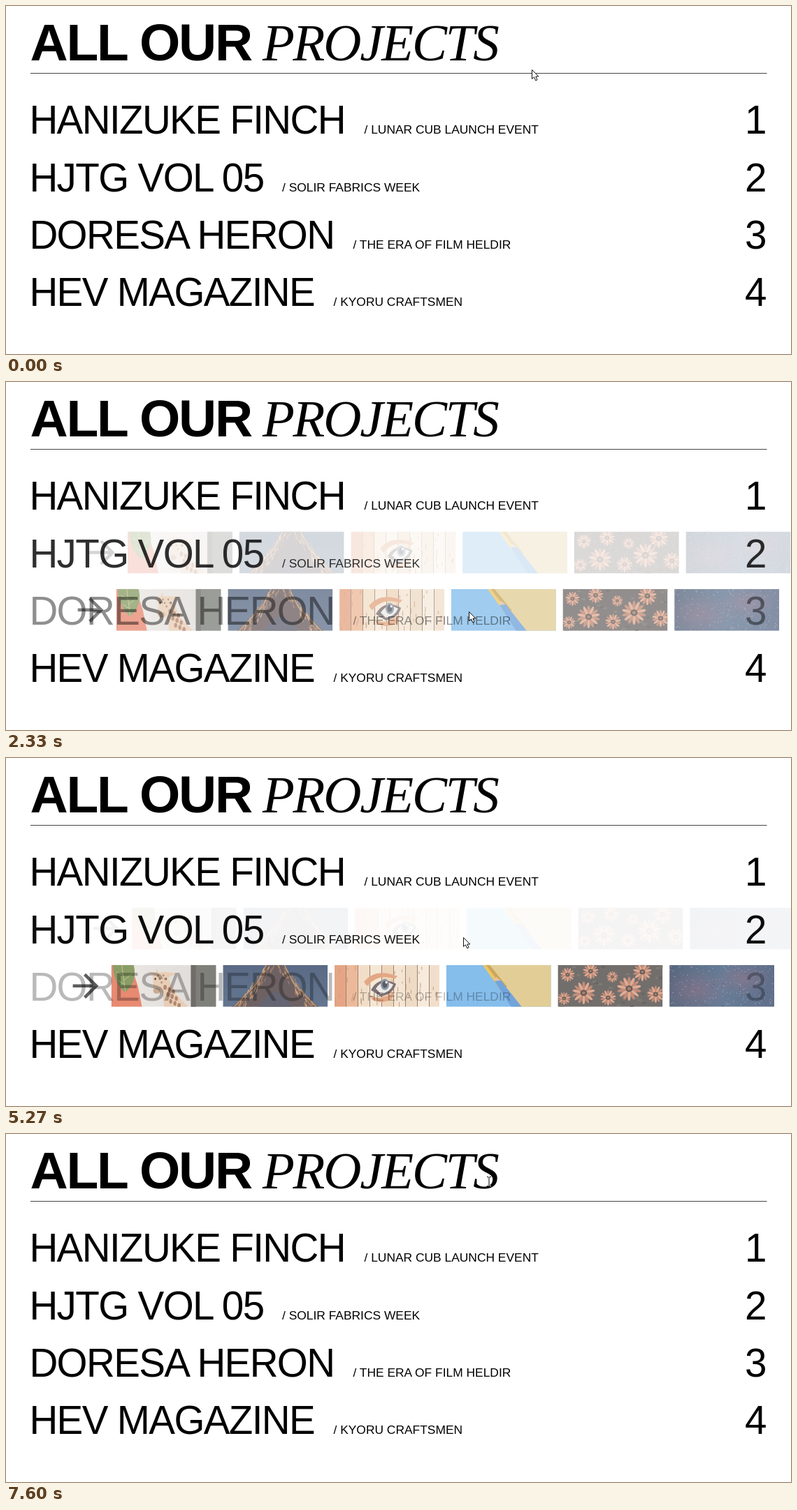
These frames come from a looping animation (1123 px wide and 499 px high, 8540 ms). An HTML page:

```html
<!DOCTYPE html>
<html lang="en">
<head>
<meta charset="utf-8">
<title>All our projects</title>
<style>
  html, body { margin: 0; width: 100%; height: 100%; overflow: hidden; background: #fff; }
  #stage { display: block; width: 1123px; height: 499px; }
  text { font-family: "Liberation Sans", Arial, sans-serif; fill: #000; }
  .bold { font-size: 75px; font-weight: 700; letter-spacing: -2.2px; }
  .italic { font: italic 75px "Liberation Serif", "Times New Roman", serif; letter-spacing: -2.2px; }
  .name { font-size: 56.5px; letter-spacing: -1.6px; }
  .note { font-size: 17.4px; }
  #beam { mix-blend-mode: difference; }
</style>
</head>
<body>
<svg id="stage" viewBox="0 0 1123 499">
  <defs>
    <linearGradient id="wall"><stop offset="0" stop-color="#e6e1dc"/><stop offset="1" stop-color="#d3cdc9"/></linearGradient>
    <linearGradient id="dusk" x2="0" y2="1"><stop offset="0" stop-color="#1f3458"/><stop offset="1" stop-color="#2c4468"/></linearGradient>
    <linearGradient id="sky"><stop offset="0" stop-color="#1d3150"/><stop offset=".5" stop-color="#2f4c70"/><stop offset="1" stop-color="#263a60"/></linearGradient>
    <radialGradient id="glow"><stop offset="0" stop-color="#8a4560" stop-opacity=".4"/><stop offset="1" stop-color="#8a4560" stop-opacity="0"/></radialGradient>
    <g id="strip">
      <path d="M-55 30H-22M-38 13.500L-21.500 30L-38 46.500" fill="none" stroke="#222" stroke-width="4.500"/>
      <g id="photos"></g>
    </g>
  </defs>
  <rect width="1123" height="499" fill="#fff"/>
  <text class="bold" x="34.500" y="78">ALL OUR</text>
  <text class="italic" x="367" y="78">PROJECTS</text>
  <path d="M35 96.500H1088.500" stroke="#444"/>
  <g id="rows"></g>
  <path id="arrow" d="M.5 .5V13.500L3.500 10.800L5.700 15.800L8 14.800L5.900 10H9.800Z" fill="#fff" stroke="#111" stroke-linejoin="round"/>
  <path id="beam" d="M-3 -6.500H-1L0 -5.500L1 -6.500H3M0 -5.500V5.500M-3 6.500H-1L0 5.500L1 6.500H3" fill="none" stroke="#fff"/>
</svg>
<script>
const LOOP = 8540, STEP = 200 / 3, FADE = 300;
const ROW_TOP = 132.2, ROW_STEP = 82.3;
const X_OUT = 182, SLIDE = 43;
const $ = id => document.getElementById(id);

const projects = [
  ['HANIZUKE FINCH', '/ LUNAR CUB LAUNCH EVENT', 512.5],
  ['HJTG VOL 05', '/ SOLIR FABRICS WEEK', 395],
  ['DORESA HERON', '/ THE ERA OF FILM HELDIR', 496.5],
  ['HEV MAGAZINE', '/ KYORU CRAFTSMEN', 468.5],
];

// row, pointer enters, pointer leaves
const hovers = [
  [0, 235, 1120], [1, 1235, 2180], [2, 2235, 3183], [3, 3246, 4280],
  [2, 4322, 5210], [1, 5246, 6210], [0, 6295, 7300],
];

// start, end, x, y reached at the end
const moves = [
  [0, 0, 752, 91], [20, 400, 716, 160], [900, 1400, 676, 255],
  [1960, 2360, 662, 330], [2960, 3330, 646, 397], [4130, 4470, 647, 326],
  [5050, 5310, 655, 252], [6080, 6400, 661, 156], [7150, 7530, 691, 68],
];

let seed = 7;
const random = () => (seed = seed * 16807 % 2147483647) / 2147483647;
const times = (n, make) => Array.from({ length: n }, (_, i) => make(i)).join('');
const box = (x, y, w, h, fill) => `<rect x="${x}" y="${y}" width="${w}" height="${h}" fill="${fill}"/>`;
const oval = (x, y, rx, ry, fill, extra = '') =>
  `<ellipse cx="${x}" cy="${y}" rx="${rx}" ry="${ry}" fill="${fill}" ${extra}/>`;
const path = (d, fill) => `<path d="${d}" fill="${fill}"/>`;
const line = (d, color, width = 1) => `<path d="${d}" fill="none" stroke="${color}" stroke-width="${width}"/>`;

function giraffe() {
  const coat = '#e0bd9c', spot = '#9a5c3a';
  return box(0, 0, 150, 60, 'url(#wall)')
    + path('M0 0H28L38 30L44 60H0Z', '#e0603f')
    + path('M2 0H32Q38 24 20 39Q4 28 2 0Z', '#5f7a2f')
    + line('M15 0L20 38M17 14L7 10M18 22L30 12M19 28L9 22', '#a3b364')
    + box(114, 0, 36, 60, '#50524a') + box(114, 0, 7, 60, '#3a3832')
    + path('M70 26L82 20L91 40L110 60H76Z', coat)
    + path('M59 14L53 10L64 11L65 5L68 11L76 10L93 12L82 18L80 29L70 41L60 38L60 26Z', coat)
    + oval(65, 37, 5, 4, '#b48b6d') + oval(63, 20, 1.5, 1.8, '#241a16') + oval(78, 20, 1.5, 1.8, '#241a16')
    + times(12, i => oval(77 + i % 3 * 6 + (i >> 2) * 4, 32 + (i >> 2) * 10 + i % 3 * 3, 2.2, 3.4, spot))
    + times(5, i => oval(67 + i * 2.5, 15 + i % 3 * 5, 1.3, 1.6, spot));
}

function tower() {
  const braces = times(130, i => {
    const y = random() * 60, side = random() < .5 ? -1 : 1;
    const x = 75 + side * (random() * 14 + y * .72);
    return line(`M${x} ${y}l${side * 2} 5`, i % 3 ? '#7d4f32' : '#d09355', 1.2);
  });
  return box(0, 0, 150, 60, 'url(#dusk)')
    + path('M62 0H88L101 26L137 60H13L49 26Z', '#38272a') + braces
    + path('M75 38Q60 45 51 60H99Q90 45 75 38Z', '#2b2c40')
    + line('M62 0L49 26L16 60M88 0L101 26L134 60', '#b97b45', 1.3);
}

function planks() {
  const tones = ['#dc8458', '#e6a175', '#eed3b4', '#f2dfc6', '#e9c7a2', '#f0dcc4', '#e8cfb0', '#f3e4d0', '#ecd4b8'];
  return tones.map((tone, i) => box(i * 17, 0, 17, 60, tone) + box(i * 17 + 16, 0, 1, 60, '#765240')).join('')
    + times(40, () => box(random() * 150, random() * 55, 1, 3 + random() * 6, '#b77b56'))
    + path('M42 24Q58 4 90 16L86 20Q64 11 46 30Z', '#d98757')
    + path('M52 36Q64 14 88 27Q84 42 66 45Z', '#4d3f42')
    + path('M59 34Q68 19 84 28Q79 40 66 41Z', '#e8e4df')
    + oval(72, 28, 6, 8, '#5f7284') + oval(72, 28, 3.5, 5, '#1c2029') + oval(74, 25, 1.5, 1.8, '#fff')
    + path('M50 43Q66 53 86 38L82 49Q66 57 54 50Z', '#d98757');
}

function pencils() {
  return box(0, 0, 150, 60, '#59a5e4') + path('M57 0H150V60H101Z', '#d8bb70')
    + path('M52 0H62L87 31L92 46L79 38Z', '#e3b12f') + path('M57 0H62L87 31L83 35Z', '#b88720')
    + path('M79 38L87 31L92 46Z', '#e6c8a0') + path('M88 42L91 40L92 46Z', '#333')
    + path('M69 23L78 22L108 60H93Z', '#3e83cf') + path('M69 23L71 17L78 22Z', '#d9a88a');
}

function flowers() {
  const bloom = (x, y, r) => times(14, i =>
    oval(x, y - r * .62, r * .13, r * .4, i % 2 ? '#d48d6c' : '#ad6248', `transform="rotate(${i * 360 / 14} ${x} ${y})"`))
    + oval(x, y, r * .3, r * .27, '#30211f') + oval(x, y, r * .15, r * .13, '#8c5635');
  return box(0, 0, 150, 60, '#3f3936')
    + times(45, () => oval(random() * 150, random() * 60, 3, 1.5, random() < .5 ? '#524b42' : '#302c2c'))
    + bloom(14, 14, 10) + bloom(47, 9, 11) + bloom(121, 10, 13) + bloom(78, 17, 8)
    + bloom(37, 40, 16) + bloom(102, 34, 17) + bloom(72, 47, 11) + bloom(140, 42, 12) + bloom(9, 48, 9);
}

function stars() {
  const tints = ['#86a9c4', '#b56f82', '#4f7899', '#16223c'];
  return box(0, 0, 150, 60, 'url(#sky)')
    + oval(38, 36, 50, 30, 'url(#glow)') + oval(105, 20, 42, 24, 'url(#glow)')
    + times(260, i => oval((random() * 150).toFixed(1), (random() * 60).toFixed(1), .6, .6, tints[i % 4]));
}

$('photos').innerHTML = [giraffe, tower, planks, pencils, flowers, stars]
  .map((draw, i) => `<svg x="${i * 159.7}" width="150" height="60">${draw()}</svg>`).join('');

$('rows').innerHTML = projects.map(([name, note, noteX], i) => {
  const y = ROW_TOP + i * ROW_STEP, base = Math.round(y + 51);
  return `<g><use href="#strip" y="${y}"/><g>
    <text class="name" x="33.400" y="${base}">${name}</text>
    <text class="note" x="${noteX}" y="${base}">${note}</text>
    <text class="name" x="1057" y="${base}">${i + 1}</text></g></g>`;
}).join('');
const rows = [...$('rows').children].map(g => ({ strip: g.children[0], label: g.children[1] }));

const clamp = v => Math.min(1, Math.max(0, v));
const smooth = u => u * u * (3 - 2 * u);

// cubic-bezier(.25, .1, .25, 1)
function ease(x) {
  if (x <= 0 || x >= 1) return clamp(x);
  const curve = (a, b, s) => 3 * a * s * (1 - s) ** 2 + 3 * b * s * s * (1 - s) + s ** 3;
  let low = 0, high = 1;
  for (let i = 0; i < 18; i++) {
    const mid = (low + high) / 2;
    if (curve(.25, .25, mid) < x) low = mid; else high = mid;
  }
  return curve(.1, 1, low);
}

function pointerAt(t) {
  let [, , x, y] = moves[0];
  for (const [start, end, toX, toY] of moves.slice(1)) {
    const u = smooth(clamp((t - start) / (end - start)));
    x += (toX - x) * u;
    y += (toY - y) * u;
  }
  return [x, y];
}

function render(t) {
  const shown = [0, 0, 0, 0];
  for (const [row, enter, leave] of hovers)
    shown[row] += ease((t - enter) / FADE) * (1 - ease((t - leave) / FADE));
  rows.forEach(({ strip, label }, i) => {
    strip.setAttribute('x', X_OUT - SLIDE * shown[i]);
    strip.setAttribute('opacity', shown[i]);
    label.setAttribute('opacity', 1 - shown[i]);
  });
  const [x, y] = pointerAt(t), overTitle = y < 82;
  const place = `translate(${Math.round(x)} ${Math.round(y)})`;
  for (const [id, visible] of [['arrow', !overTitle], ['beam', overTitle]]) {
    $(id).setAttribute('transform', place);
    $(id).setAttribute('visibility', visible ? 'visible' : 'hidden');
  }
}

const begin = performance.now();
function tick() {
  const t = (performance.now() - begin) % LOOP;
  render(Math.floor((t + 4) / STEP) * STEP);
  requestAnimationFrame(tick);
}
tick();
</script>
</body>
</html>
```
